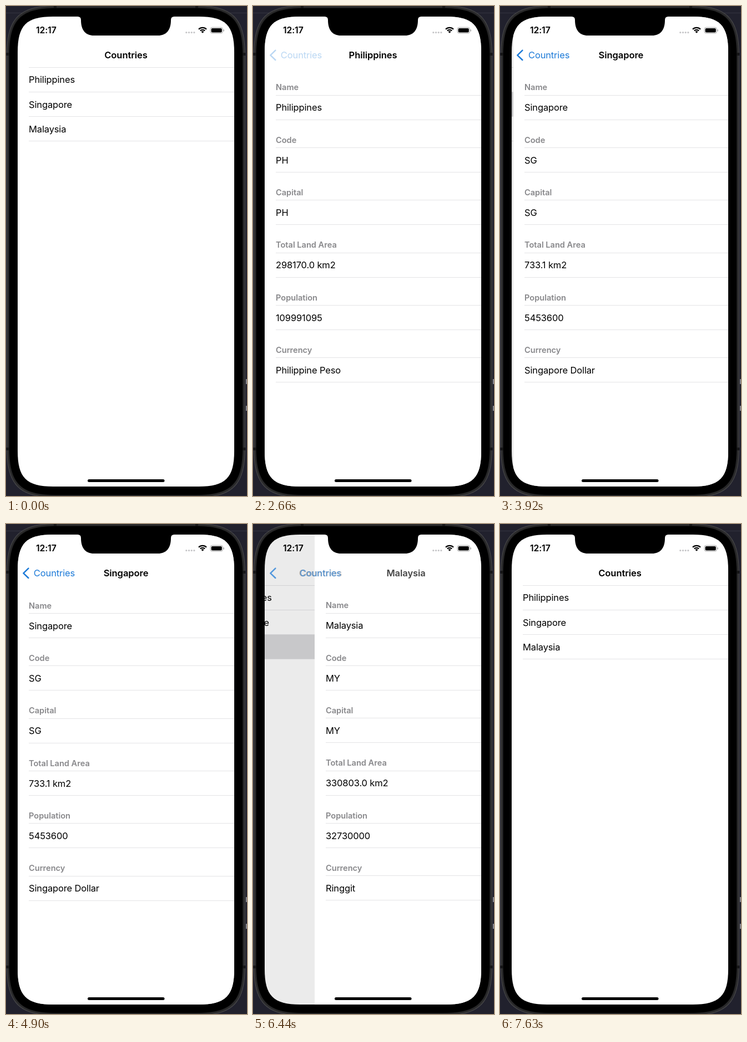
An HTML page with a canvas that plays this animation: 434x880 px, repeating every 7980 ms.

```html
<!DOCTYPE html>
<html lang="en">
<head>
<meta charset="utf-8">
<title>Countries</title>
<style>
  html, body { margin: 0; width: 100%; height: 100%; overflow: hidden; background: #21212d; }
  canvas { display: block; width: 434px; height: 880px; }
</style>
</head>
<body>
<canvas id="stage" width="434" height="880"></canvas>
<script>
const ctx = document.getElementById('stage').getContext('2d');
const LOOP = 7980, STEP = 70;
const LEFT = 21, TOP = 19, WIDTH = 390, HEIGHT = 844, CENTER = 216;
const BLUE = '#1c7ad8', LINE = '#e4e4e6';
const BODY = { size: 16.5, weight: 400, spacing: -0.14 };
const TITLE = { size: 16.5, weight: 600, spacing: -0.06 };
const HEADER = { size: 14.6, weight: 600, spacing: -0.02 };
const CLOCK = { size: 15.8, weight: 600, spacing: -0.15 };

const LABELS = ['Name', 'Code', 'Capital', 'Total Land Area', 'Population', 'Currency'];
const COUNTRIES = [
  ['Philippines', 'PH', 'PH', '298170.0 km2', '109991095', 'Philippine Peso'],
  ['Singapore', 'SG', 'SG', '733.1 km2', '5453600', 'Singapore Dollar'],
  ['Malaysia', 'MY', 'MY', '330803.0 km2', '32730000', 'Ringgit']
];

// tap: row lights up, push: detail enters, press: back dims, pop: detail leaves
const VISITS = [
  { tap: 770, push: 894, press: 2660, pop: 2785 },
  { tap: 3500, push: 3530, press: 5390, pop: 5490.5 },
  { tap: 6284, push: 6284, press: 6930, pop: 7100 }
];

// critically damped spring from 0 to 1
function spring(ms) {
  if (ms <= 0) return 0;
  if (ms > 500) return 1;
  const x = ms * 0.018;
  return 1 - (1 + x) * Math.exp(-x);
}

// a short pull on the second detail page that springs back
function pullOffset(t) {
  const start = 4620, peak = 5110, end = 5390;
  if (t <= start || t >= end) return 0;
  if (t < peak) return 29 * Math.pow((t - start) / (peak - start), 7.6);
  const back = (t - peak) / (end - peak);
  return 29 * Math.pow(1 - back, 2.5);
}

function text(str, x, y, font, color, align = 'left', alpha = 1) {
  if (alpha <= 0) return;
  ctx.globalAlpha = alpha;
  ctx.font = `${font.weight} ${font.size}px Inter, "Open Sans", sans-serif`;
  ctx.letterSpacing = font.spacing + 'px';
  ctx.textAlign = align;
  ctx.fillStyle = color;
  ctx.fillText(str, x, y);
  ctx.globalAlpha = 1;
}

function rect(x, y, w, h, color) {
  ctx.fillStyle = color;
  ctx.fillRect(x, y, w, h);
}

function pill(x, y, w, h, r, color) {
  ctx.beginPath();
  ctx.roundRect(x, y, w, h, r);
  ctx.fillStyle = color;
  ctx.fill();
}

// rectangle with continuous-curvature corners, grown from the screen edge
function shell(grow) {
  const x0 = LEFT - grow, y0 = TOP - grow;
  const x1 = LEFT + WIDTH + grow, y1 = TOP + HEIGHT + grow;
  const r = 47 + grow, a = r * 1.36, c = r * 0.33;
  ctx.beginPath();
  ctx.moveTo(x0 + a, y0);
  ctx.lineTo(x1 - a, y0);
  ctx.bezierCurveTo(x1 - c, y0, x1, y0 + c, x1, y0 + a);
  ctx.lineTo(x1, y1 - a);
  ctx.bezierCurveTo(x1, y1 - c, x1 - c, y1, x1 - a, y1);
  ctx.lineTo(x0 + a, y1);
  ctx.bezierCurveTo(x0 + c, y1, x0, y1 - c, x0, y1 - a);
  ctx.lineTo(x0, y0 + a);
  ctx.bezierCurveTo(x0, y0 + c, x0 + c, y0, x0 + a, y0);
  ctx.closePath();
}

function fillShell(grow, color) {
  shell(grow);
  ctx.fillStyle = color;
  ctx.fill();
}

function drawCase() {
  rect(0, 0, 434, 880, '#21212d');
  rect(0, 12, 434, 1, '#34343f');
  for (const y of [670, 718]) rect(432, y, 2, 9, '#8a8a92');
  fillShell(20, '#4b4b4d');
  fillShell(19, '#2a2a2b');
  fillShell(16, '#1d1d1e');
  for (const y of [84, 793]) {
    rect(1, y, 5, 5, '#151516');
    rect(426, y, 5, 5, '#151516');
  }
  for (const x of [86, 341]) rect(x, 0, 5, 4, '#151516');
  fillShell(15, '#000');
}

function drawList(shift, dim, lit) {
  rect(LEFT, TOP, WIDTH, HEIGHT, '#fff');
  if (lit >= 0) rect(LEFT + shift, 110 + 44 * lit, WIDTH, 45, '#d9d9db');
  for (let i = 0; i < 4; i++) rect(41 + shift, 110 + 44 * i, 370, 1, LINE);
  COUNTRIES.forEach((c, i) => text(c[0], 41 + shift, 138.4 + 44.2 * i, BODY, '#000'));
  if (dim > 0) rect(LEFT, TOP, WIDTH, HEIGHT, `rgba(0,0,0,${dim})`);
}

function drawDetail(country, shift, scroll) {
  rect(LEFT + shift, TOP, WIDTH, HEIGHT, '#fff');
  LABELS.forEach((label, i) => {
    const y = 160.1 + 94.3 * i + scroll;
    const x = 41 + shift;
    text(label, x, y - 8.8, HEADER, '#88888b');
    text(country[i], x, y + 28.3, BODY, '#000');
    rect(x, Math.floor(y), 370, 1, LINE);
    rect(x, Math.floor(y + 44), 370, 1, LINE);
  });
}

function drawChevron(alpha) {
  ctx.globalAlpha = alpha;
  ctx.beginPath();
  ctx.moveTo(40.4, 79.6);
  ctx.lineTo(31.4, 88.3);
  ctx.lineTo(40.4, 97);
  ctx.strokeStyle = BLUE;
  ctx.lineWidth = 2.5;
  ctx.lineCap = ctx.lineJoin = 'round';
  ctx.stroke();
  ctx.globalAlpha = 1;
}

// q: 0 = list bar, 1 = detail bar
function drawNav(q, name, pressed, leaving) {
  const y = 94.1;
  const x = CENTER - 129 * q;
  text('Countries', x, y, TITLE, '#000', 'center', 1 - q);
  if (q <= 0) return;
  const fade = pressed ? 0.3 : 1;
  text('Countries', x, y, BODY, BLUE, 'center', q * fade);
  drawChevron(q * (leaving ? 0.65 : fade));
  text(name, CENTER + 223 * (1 - q), y, TITLE, '#000', 'center', q);
}

function drawWifi() {
  const x = 354, y = 48.8, from = -Math.PI * 0.75, to = -Math.PI * 0.25;
  ctx.strokeStyle = ctx.fillStyle = '#000';
  ctx.lineCap = 'butt';
  ctx.lineWidth = 2.3;
  for (const r of [6, 9.9]) {
    ctx.beginPath();
    ctx.arc(x, y, r, from, to);
    ctx.stroke();
  }
  ctx.beginPath();
  ctx.moveTo(x, y);
  ctx.arc(x, y, 3.5, from, to);
  ctx.fill();
}

function drawStatus() {
  text('12:17', 54, 49.4, CLOCK, '#000');
  for (let i = 0; i < 4; i++) pill(323.2 + 4.7 * i, 46, 3.2, 3.2, 1.6, '#c6c6c8');
  drawWifi();
  ctx.beginPath();
  ctx.roundRect(368, 38.4, 22.5, 10.6, 3.4);
  ctx.strokeStyle = '#a5a5a5';
  ctx.lineWidth = 1;
  ctx.stroke();
  pill(369.6, 40, 19.2, 7.4, 2, '#000');
  pill(391.6, 42, 1.4, 3.8, [0, 1.4, 1.4, 0], '#a5a5a5');
}

function drawNotch() {
  const l = 135, r = 297, b = 53, y = TOP - 1;
  ctx.beginPath();
  ctx.moveTo(l - 6, y);
  ctx.lineTo(l - 6, y + 1);
  ctx.quadraticCurveTo(l, y + 1, l, y + 7);
  ctx.bezierCurveTo(l, b - 9, l + 9, b, l + 23, b);
  ctx.lineTo(r - 23, b);
  ctx.bezierCurveTo(r - 9, b, r, b - 9, r, y + 7);
  ctx.quadraticCurveTo(r, y + 1, r + 6, y + 1);
  ctx.lineTo(r + 6, y);
  ctx.fillStyle = '#000';
  ctx.fill();
}

function draw(t) {
  let index = 0;
  VISITS.forEach((v, i) => { if (t >= v.tap) index = i; });
  const v = VISITS[index];
  const leaving = t >= v.pop;
  const progress = lag => leaving ? 1 - spring(t - v.pop - lag) : spring(t - v.push - lag);
  const p = progress(0);
  const lit = t >= v.tap && !leaving ? index : -1;

  drawCase();
  ctx.save();
  shell(0);
  ctx.clip();
  drawList(-0.3 * WIDTH * p, 0.1 * p, lit);
  if (p > 0) drawDetail(COUNTRIES[index], Math.round(WIDTH * (1 - p)), pullOffset(t));
  drawNav(progress(11.5), COUNTRIES[index][0], t >= v.press && !leaving, leaving);
  drawStatus();
  ctx.restore();
  drawNotch();
  pill(147, 850, 138.5, 5, 2.5, '#000');
}

const begin = performance.now();
function tick() {
  const t = (performance.now() - begin) % LOOP;
  draw(Math.floor(t / STEP) * STEP);
  requestAnimationFrame(tick);
}
tick();
</script>
</body>
</html>
```
